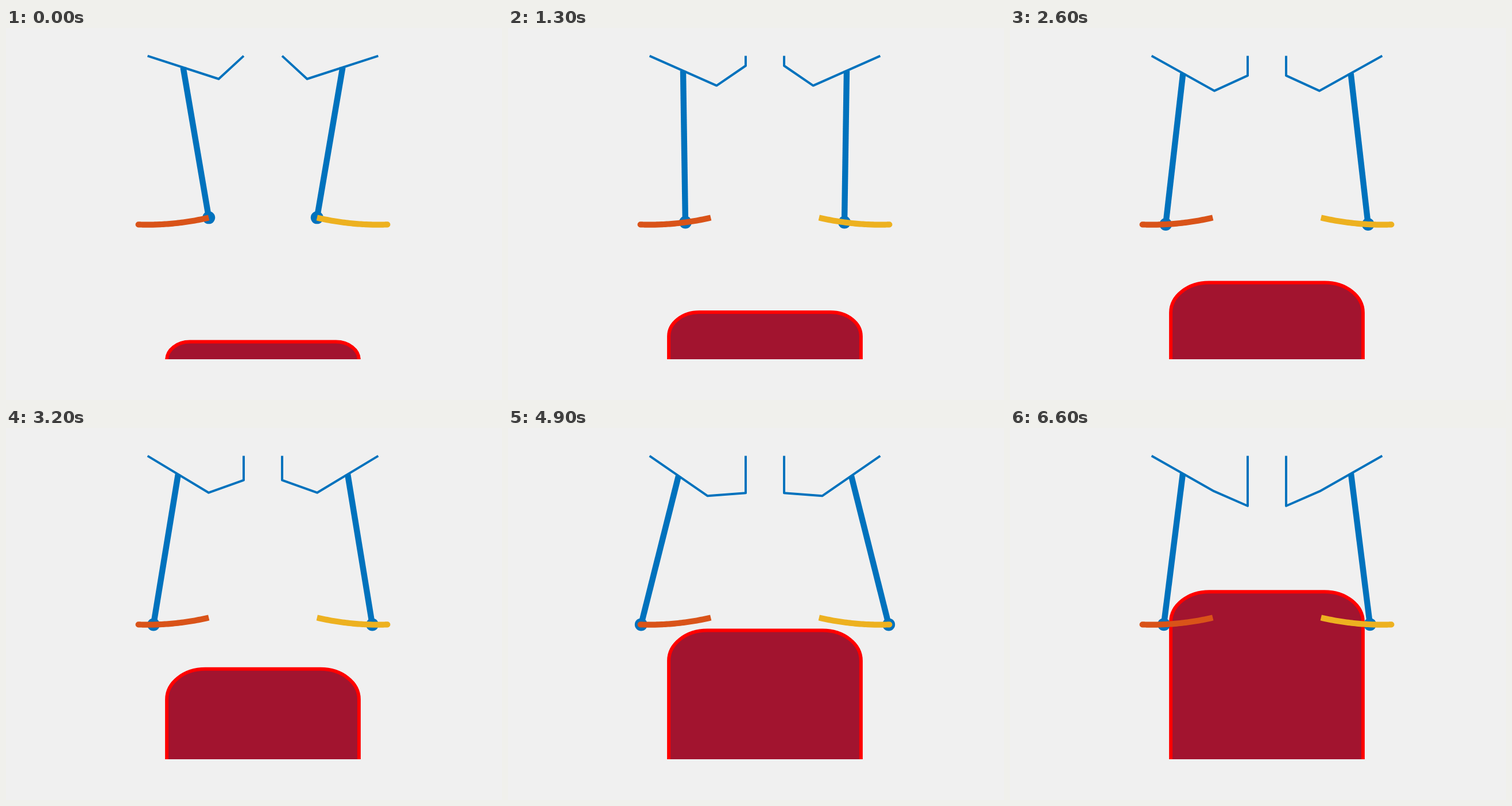
Animation, 864 px wide and 648 px high, one loop 7100 ms. Source, as an HTML page with a canvas:

```html
<!DOCTYPE html>
<html lang="en">
<head>
<meta charset="utf-8">
<title>Linkage</title>
<style>
  html, body { margin: 0; width: 100%; height: 100%; overflow: hidden; background: #f0f0f0; }
  canvas { display: block; }
</style>
</head>
<body>
<canvas id="stage" width="864" height="648"></canvas>
<script>
const ctx = document.getElementById('stage').getContext('2d');
const BLUE = '#0072bd', ORANGE = '#d95319', YELLOW = '#edb120';
const STEP = 100, LAST = 66, LOOP = 7100;

// Plot units: x is centred, y runs from 0 (floor) to 10 (top)
const UX = 66.96, UY = 52.81, CX = 447.5, TOP = 48.6, FLOOR = 577;
const px = x => CX + x * UX;
const py = y => TOP + (10 - y) * UY;

// Left half of the linkage; the slider drops a little each step
function pose(i) {
  const a = [-3, 10], c = [-0.5, 10 - 0.025 * i];
  const arm = 2, link = 1, rod = 5;
  const dx = c[0] - a[0], dy = c[1] - a[1], d = Math.hypot(dx, dy);
  const along = (arm * arm - link * link + d * d) / (2 * d);
  const off = Math.sqrt(arm * arm - along * along);
  const b = [a[0] + (along * dx + off * dy) / d, a[1] + (along * dy - off * dx) / d];
  const mid = [(a[0] + b[0]) / 2, (a[1] + b[1]) / 2];
  const angle = Math.atan2(b[1] - a[1], b[0] - a[0]) - Math.PI / 3;
  const tip = [mid[0] + rod * Math.cos(angle), mid[1] + rod * Math.sin(angle)];
  return { a, b, c, mid, tip };
}

const trail = Array.from({ length: LAST + 1 }, (_, i) => pose(i).tip);

function line(points, side, color, width) {
  ctx.beginPath();
  for (const [x, y] of points) ctx.lineTo(px(side * x), py(y));
  ctx.strokeStyle = color;
  ctx.lineWidth = width;
  ctx.stroke();
}

function drawBox(i) {
  const rise = 0.075 * i, height = 3 + rise;
  const r = 0.2 * Math.min(5, height);
  const left = px(-2.5), right = px(2.5), top = py(0.57 + rise);
  const rx = r * UX, ry = r * UY, bottom = FLOOR + 40;
  ctx.save();
  ctx.beginPath();
  ctx.rect(0, 0, 864, FLOOR);
  ctx.clip();
  ctx.beginPath();
  ctx.moveTo(left, bottom);
  ctx.ellipse(left + rx, top + ry, rx, ry, 0, Math.PI, 1.5 * Math.PI);
  ctx.ellipse(right - rx, top + ry, rx, ry, 0, -Math.PI / 2, 0);
  ctx.lineTo(right, bottom);
  ctx.fillStyle = '#a2142f';
  ctx.fill();
  ctx.strokeStyle = '#f00';
  ctx.lineWidth = 6;
  ctx.stroke();
  ctx.restore();
}

function drawLinkage({ a, b, c, mid, tip }, side) {
  line([a, b, c, [c[0], 10]], side, BLUE, 4);
  line([mid, tip], side, BLUE, 10.4);
  ctx.beginPath();
  ctx.arc(px(side * tip[0]), py(tip[1]), 11, 0, 2 * Math.PI);
  ctx.fillStyle = BLUE;
  ctx.fill();
}

function draw(i) {
  ctx.fillStyle = '#f0f0f0';
  ctx.fillRect(0, 0, 864, 648);
  ctx.lineJoin = 'round';
  drawBox(i);
  const p = pose(i);
  drawLinkage(p, 1);
  drawLinkage(p, -1);
  line(trail, 1, ORANGE, 10.2);
  line(trail, -1, YELLOW, 10.2);
}

function tick() {
  const t = performance.now() % LOOP;
  draw(Math.min(LAST, Math.floor(t / STEP)));
  requestAnimationFrame(tick);
}
tick();
</script>
</body>
</html>
```
